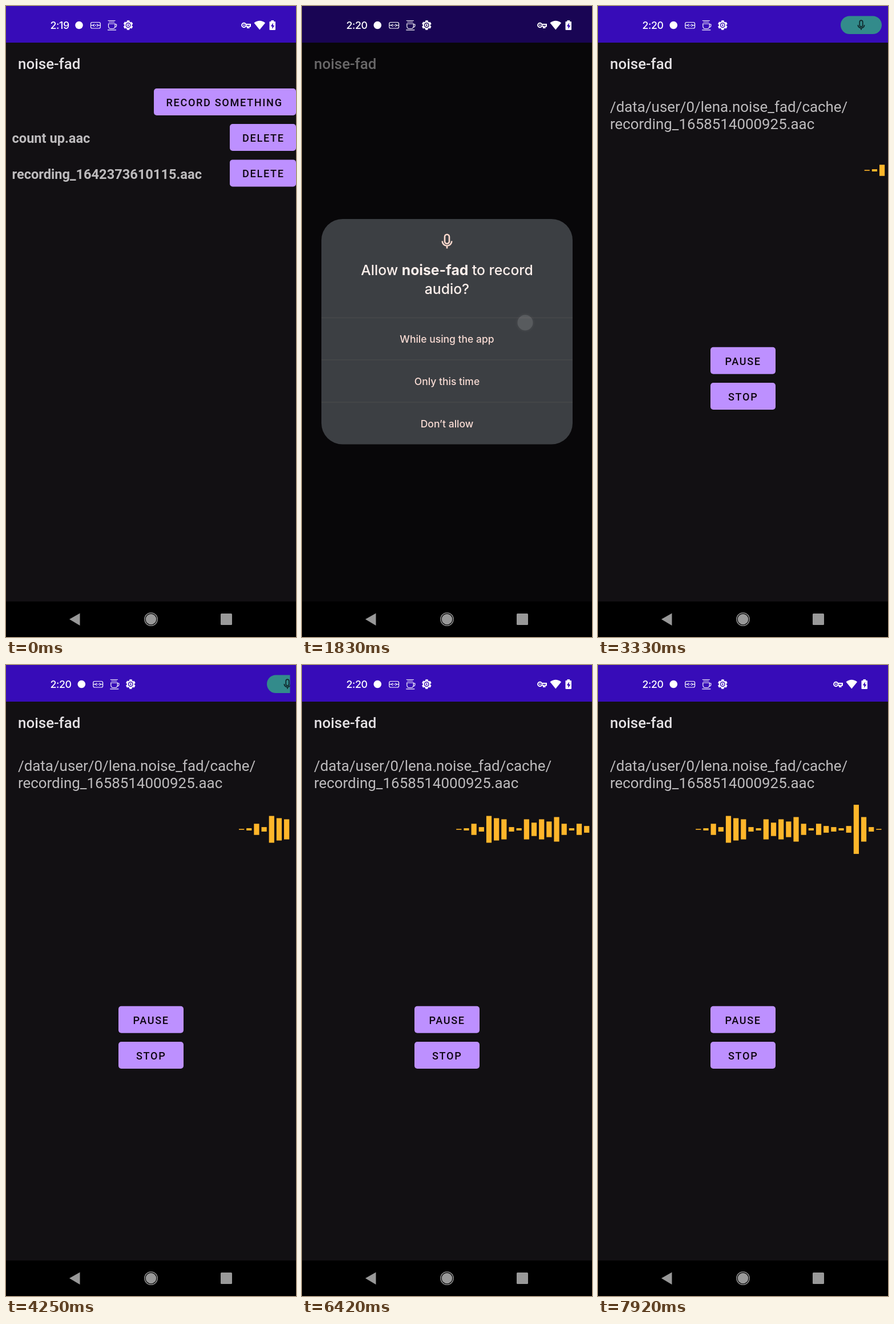
Write an HTML page that moves like this. It is 508 px wide and 1102 px high and loops after 8 s.

```html
<!DOCTYPE html>
<html lang="en">
<head>
<meta charset="utf-8">
<title>Voice recorder</title>
<style>
  html, body { margin: 0; width: 100%; height: 100%; overflow: hidden; background: #121013; }
  svg { display: block; width: 100vw; height: 100vh; font-family: Roboto, sans-serif; }
  .title { font-size: 25.9px; font-weight: 500; fill: #e4e1e4; }
  .row { font-size: 23.6px; font-weight: 700; fill: #bdbbbd; }
  .path { font-size: 25.9px; fill: #bdbbbd; }
  .label { font-size: 18.1px; font-weight: 500; letter-spacing: 1.68px; fill: #0d0612; }
  .ask, .choice, .clock { font-family: Inter, sans-serif; }
  .ask { font-size: 24.7px; font-weight: 500; fill: #fdf0ec; text-anchor: middle; }
  .choice { font-size: 17.5px; font-weight: 500; fill: #f9dcd4; text-anchor: middle; }
  .clock { font-size: 17.8px; font-weight: 500; letter-spacing: -.4px; fill: #fff; }
  .line { fill: none; stroke: #fff; }
</style>
</head>
<body>
<svg viewBox="0 0 508 1102">
  <defs>
    <clipPath id="chipClip"><rect x="400" y="10" width="97.5" height="50"/></clipPath>
    <radialGradient id="halo">
      <stop offset=".72" stop-color="#777" stop-opacity="0"/>
      <stop offset=".76" stop-color="#777" stop-opacity=".45"/>
      <stop offset="1" stop-color="#777" stop-opacity="0"/>
    </radialGradient>
    <g id="mic" fill="none" stroke-width="2.6">
      <rect x="-4" y="-11.5" width="8" height="16" rx="4"/>
      <path d="M-8.3 0a8.3 8.3 0 0 0 16.6 0M0 8.3V13"/>
    </g>
  </defs>

  <rect width="508" height="1102" fill="#121013"/>
  <rect width="508" height="64" fill="#370cb8"/>
  <text class="title" x="21" y="110">noise-fad</text>

  <g id="list">
    <text class="row" x="10.5" y="239">count up.aac</text>
    <text class="row" x="10.5" y="301.5">recording_1642373610115.aac</text>
  </g>
  <g id="ready"></g>
  <g id="recording">
    <text class="path" x="21" y="185">/data/user/0/lena.noise_fad/cache/</text>
    <text class="path" x="21" y="215">recording_1658514000925.aac</text>
    <g id="bars" fill="#ffb62a"></g>
  </g>

  <rect id="dim" width="508" height="1102" opacity="0"/>
  <g id="dialog">
    <rect x="34" y="372" width="440" height="393.5" rx="37" fill="#3c3f43"/>
    <path d="M34 544.5H474M34 618H474M34 692H474" stroke="#47484b" stroke-width="1.4"/>
    <use href="#mic" x="254" y="410.5" stroke="#fbd8cc"/>
    <text class="ask" x="254" y="470">Allow <tspan font-weight="700">noise-fad</tspan> to record</text>
    <text class="ask" x="254" y="502.5">audio?</text>
    <text class="choice" x="254" y="587.5">While using the app</text>
    <text class="choice" x="254" y="661.5">Only this time</text>
    <text class="choice" x="254" y="735.5">Don’t allow</text>
  </g>

  <text class="clock" id="clock" x="77.5" y="40"></text>
  <g id="notices">
    <circle cx="128" cy="33.5" r="6.8" fill="#fff"/>
    <g class="line" stroke-width="1.2">
      <rect x="148.5" y="28.5" width="16.8" height="10.5" rx="2.5"/>
      <path d="M149 33.7h3.5m9 0h3.5M155 31.5l-2.5 2.2 2.5 2.2m4-4.4 2.5 2.2-2.5 2.2M156 33.7h2"/>
      <path d="M178.5 25.5h13M180 28h10M179.5 31h11.5v4q0 4.5-4 4.5h-3.5q-4 0-4-4.5zM191 32h2.5q1 5-3 5M178 41.8h15"/>
    </g>
    <g class="line">
      <circle cx="214" cy="33.5" r="5.6" stroke-width="2.2"/>
      <circle cx="214" cy="33.5" r="7.3" stroke-width="2.2" stroke-dasharray="4.5 3.145" stroke-dashoffset="-1.5"/>
      <circle cx="214" cy="33.5" r="2.2" stroke-width="1.7"/>
    </g>
  </g>
  <g id="system" fill="#fff">
    <circle class="line" cx="416.8" cy="33.5" r="3.7" stroke-width="2"/>
    <path class="line" stroke-width="2" d="M420.5 32h7.5v3.5h-2.5v2.5h-2.5v-2.5h-2.5"/>
    <circle cx="416.8" cy="33.5" r="1.3"/>
    <path d="M434.5 29.5q9.8-7.5 19.6 0L444.3 41.5z"/>
    <path d="M464.5 27v-2h4.5v2h2a1 1 0 0 1 1 1v13a1 1 0 0 1-1 1h-8.500a1 1 0 0 1-1-1v-13a1 1 0 0 1 1-1z"/>
    <path d="M467.8 29.5l-4 6h2.5v4.5l4-6h-2.5z" fill="#370cb8"/>
  </g>
  <g clip-path="url(#chipClip)">
    <g id="chip">
      <rect y="17.5" width="72" height="31.5" rx="15.75" fill="#338b8b"/>
      <use href="#mic" transform="translate(36 33) scale(.68)" stroke="#10292c"/>
    </g>
  </g>

  <rect y="1040" width="508" height="62"/>
  <g fill="#999">
    <path d="M111 1071L129.5 1060.5V1082z"/>
    <circle cx="254" cy="1071" r="9.3"/>
    <circle cx="254" cy="1071" r="11.2" fill="none" stroke="#999" stroke-width="1.3"/>
    <rect x="376" y="1061" width="20" height="20" rx="1.5"/>
  </g>

  <g id="touch">
    <circle r="18" fill="url(#halo)"/>
    <circle r="13.5" fill="#fff" fill-opacity=".62"/>
  </g>
</svg>
<script>
const LOOP = 8000, FPS = 12;
const PITCH = 13.17, BAR_W = 9.2, UNIT = 3.9, ENTRY_X = 496, MID_Y = 287;
const levels = [0, 1, 5, 2, 12, 10, 9, 2, 1, 9, 6, 9, 7, 11, 5, 1, 5, 3, 2, 1, 3, 22, 11, 2, 0];

const $ = id => document.getElementById(id);
const set = (el, attrs) => { for (const k in attrs) el.setAttribute(k, attrs[k]); };
const show = (id, opacity) => set($(id), { opacity: Number(opacity) });

function add(parent, tag, attrs, text = '') {
  const el = document.createElementNS('http://www.w3.org/2000/svg', tag);
  set(el, attrs);
  el.textContent = text;
  return parent.appendChild(el);
}

function button(screen, x, y, width, textX, text) {
  add($(screen), 'rect', { x, y, width, height: 47, rx: 5, fill: '#bd90ff' });
  add($(screen), 'text', { x: textX, y: y + 30.7, class: 'label' }, text);
}

button('list', 259, 144, 249, 280.5, 'RECORD SOMETHING');
button('list', 392, 206, 116, 414, 'DELETE');
button('list', 392, 268.4, 116, 414, 'DELETE');
button('ready', 197, 564.7, 114, 222.5, 'START');
button('recording', 197, 595.8, 114, 222.5, 'PAUSE');
button('recording', 197, 658, 114, 228, 'STOP');

const bars = levels.map(n => {
  const height = Math.max(1.6, n * UNIT);
  return add($('bars'), 'rect', { y: MID_Y - height / 2, width: BAR_W, height });
});

// Linear track through [time, value] points, held at both ends.
function track(t, ...points) {
  let [t0, v0] = points[0];
  for (const [t1, v1] of points) {
    if (t < t1) return t1 > t0 ? v0 + (v1 - v0) * (t - t0) / (t1 - t0) : v1;
    [t0, v0] = [t1, v1];
  }
  return v0;
}

// Each tap: place, then start, end of hold and end of fade.
const taps = [
  [424, 168, 750, 833, 1000],
  [391, 553, 1580, 1667, 1885],
  [288, 589, 2250, 2501, 2667]
];

function draw(t) {
  const started = t > 990, running = t > 2650;
  show('list', !started);
  show('ready', started && !running);
  show('recording', running);

  const ask = track(t, [1000, 0], [1250, 1], [1840, 1], [2083, 0]);
  show('dim', ask * .54);
  show('dialog', ask);

  $('clock').textContent = started ? '2:20' : '2:19';
  set($('notices'), { transform: `translate(${started ? 4.3 : 0} 0)` });

  const chipX = track(t, [2833, 500], [3167, 425], [4083, 425], [4250, 457], [4417, 500]);
  set($('chip'), { transform: `translate(${chipX} 0)` });
  show('system', track(t, [2667, 1], [2833, 0], [4417, 0], [4667, 1]));

  const left = track(t, [2500, 520], [4250, 408], [5250, 344], [6420, 270], [7920, 171]);
  bars.forEach((bar, i) => {
    const x = left + i * PITCH;
    set(bar, { x, opacity: Number(x <= ENTRY_X) });
  });

  const tap = taps.find(([, , from, , to]) => t >= from && t < to);
  show('touch', tap ? track(t, [tap[3], 1], [tap[4], 0]) : 0);
  if (tap) set($('touch'), { transform: `translate(${tap[0]} ${tap[1]})` });
}

function tick() {
  const t = performance.now() % LOOP;
  draw(Math.floor((t + 4) * FPS / 1000) * 1000 / FPS % LOOP);
  requestAnimationFrame(tick);
}
tick();
</script>
</body>
</html>
```
